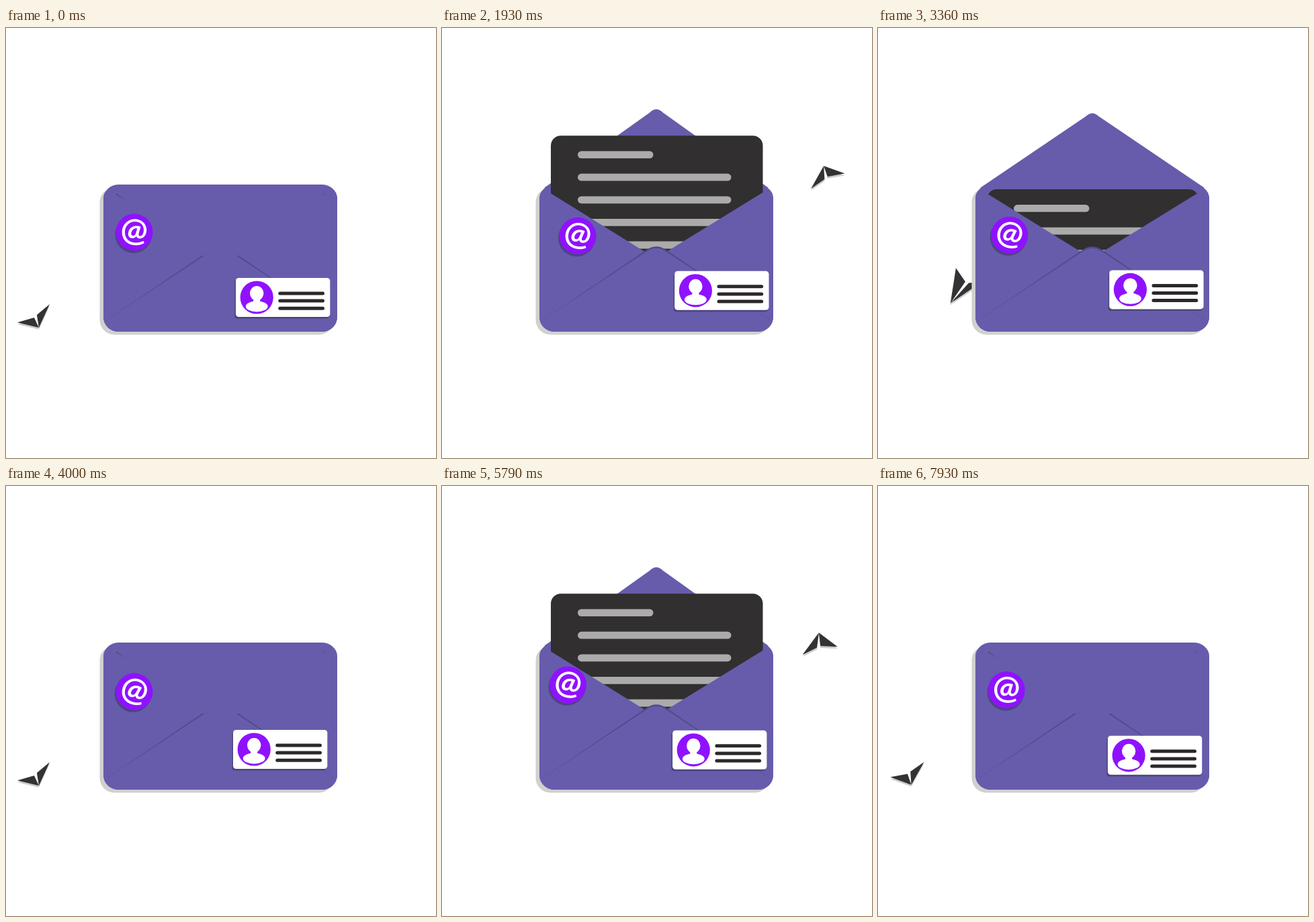
An HTML page with a canvas for the animation above (8 s loop, 640 by 640 pixels).

```html
<!DOCTYPE html>
<html lang="en">
<head>
<meta charset="utf-8">
<title>Mail</title>
<style>
html, body { margin: 0; width: 100%; height: 100%; overflow: hidden; background: #fff; }
canvas { display: block; width: 640px; height: 640px; }
</style>
</head>
<body>
<canvas id="stage" width="640" height="640"></canvas>
<script>
const ctx = document.getElementById('stage').getContext('2d');
const PURPLE = '#665cab', FOLD = '#51488c', VIOLET = '#8f12ff', DARK = '#312f30';
const SHADE = 'rgba(50,45,85,.5)';
const LOOP = 8000, CYCLE = 4000, HALF = 2000;

// Drifting stickers: time, badge x, y and tilt, card x, y
const drift = [
  [0, 191, 304, 2, 342, 372],
  [1070, 203, 308.5, 10, 342.5, 365.5],
  [2860, 198, 309, 9, 348.5, 359.5],
  [4000, 191, 306, 15, 338, 363],
  [4930, 175.5, 300.5, 2, 343.5, 366],
  [6860, 204, 293, 19, 341.5, 362]
];

// Plane seen while turning and while gliding, nose at the origin, [along, across]:
// wing tip, inner edge, inner edge, wing tip
const turning = [[-16, 29], [-16.4, 2.9], [-19.2, -2], [-29.8, -24.6]];
const gliding = [[-61, 20], [-48.5, -1.5], [-49, -7], [-62, -19.5]];

const clamp = v => Math.max(0, Math.min(1, v));
const mix = (a, b, u) => a + (b - a) * u;
const ramp = (t, from, to) => clamp((t - from) / (to - from));
const sine = u => (1 - Math.cos(Math.PI * u)) / 2;
const cubic = u => u < 0.5 ? 4 * u ** 3 : 1 - 4 * (1 - u) ** 3;
const hump = u => Math.sin(Math.PI * u);
const rad = deg => deg * Math.PI / 180;

// Smooth cyclic curve through the keys
function sample(keys, t) {
  const n = keys.length;
  const at = i => keys[(i + n) % n];
  const time = i => at(i)[0] + Math.floor(i / n) * LOOP;
  let i = 0;
  while (i < n - 1 && t >= time(i + 1)) i++;
  const h = time(i + 1) - time(i), u = (t - time(i)) / h;
  const slope = (k, j) => (at(k + 1)[j] - at(k - 1)[j]) / (time(k + 1) - time(k - 1)) * h;
  return at(i).map((v, j) => {
    const d = at(i + 1)[j] - v, a = slope(i, j), b = slope(i + 1, j);
    return v + u * (a + u * (3 * d - 2 * a - b + u * (a + b - 2 * d)));
  });
}

function poly(points, color) {
  ctx.fillStyle = color;
  ctx.beginPath();
  points.forEach(p => ctx.lineTo(p[0], p[1]));
  ctx.closePath();
  ctx.fill();
}

function box(x, y, w, h, r, color) {
  ctx.fillStyle = color;
  ctx.beginPath();
  ctx.roundRect(x, y, w, h, r);
  ctx.fill();
}

function oval(x, y, rx, ry, color) {
  ctx.fillStyle = color;
  ctx.beginPath();
  ctx.ellipse(x, y, rx, ry, 0, 0, 2 * Math.PI);
  ctx.fill();
}

function flap(open) {
  const hinge = 238, tip = 1 - 2 * open;
  ctx.fillStyle = PURPLE;
  ctx.beginPath();
  ctx.moveTo(152, hinge);
  ctx.lineTo(309, hinge + 112 * tip);
  ctx.quadraticCurveTo(319, hinge + 122 * tip, 329, hinge + 112 * tip);
  ctx.lineTo(486, hinge);
  ctx.closePath();
  ctx.fill();
}

function letter(t) {
  const up = cubic(ramp(t, 450, 1100)) * (1 - cubic(ramp(t, 2870, 3400)));
  const y = 160.2 + 80 * (1 - up);
  box(162, y, 315.5, 345 - y, [15, 15, 0, 0], DARK);
  for (let i = 0; i < 5; i++) {
    const full = i ? 228.5 : 112.5, start = i ? 666 + 190 * i : 750;
    const w = full * ramp(t, start, start + full * 0.87);
    if (w > 1) box(202, y + 23 + i * 33.6, w, 10.8, 5.4, '#ababab');
  }
}

function bottomFold(lift, color) {
  ctx.fillStyle = color;
  ctx.beginPath();
  ctx.moveTo(148, 436);
  ctx.lineTo(304, 333 - lift);
  ctx.quadraticCurveTo(319, 322.5 - lift, 334, 333 - lift);
  ctx.lineTo(490, 436);
  ctx.closePath();
  ctx.fill();
}

function pocket() {
  ctx.fillStyle = PURPLE;
  ctx.beginPath();
  ctx.moveTo(145, 255);
  ctx.quadraticCurveTo(145, 244, 152, 240);
  ctx.lineTo(301, 332.5);
  ctx.lineTo(335, 332.5);
  ctx.lineTo(486, 239.5);
  ctx.quadraticCurveTo(493, 244, 493, 255);
  ctx.arcTo(493, 452, 470, 452, 22);
  ctx.arcTo(145, 452, 145, 430, 22);
  ctx.closePath();
  ctx.fill();
  bottomFold(2.5, FOLD);
  bottomFold(0, PURPLE);
}

function envelope(t) {
  const open = sine(ramp(t, 70, 520)) * (1 - sine(ramp(t, 3300, 3900)));
  box(139.5, 237.5, 348, 219, 22, '#d0d0d0');
  if (open > 0.5) flap(open);
  box(145, 233, 348, 219, 22, PURPLE);
  letter(t);
  pocket();
  if (open <= 0.5) flap(open);
}

function badge(x, y, tilt) {
  ctx.save();
  ctx.translate(x, y);
  ctx.rotate(rad(tilt));
  oval(-1, 3.5, 27.5, 27.5, SHADE);
  oval(0, 0, 27.5, 27.5, VIOLET);
  ctx.fillStyle = '#fff';
  ctx.font = '700 48px Lato, "Open Sans", sans-serif';
  const m = ctx.measureText('@');
  ctx.fillText('@', (m.actualBoundingBoxLeft - m.actualBoundingBoxRight) / 2,
    (m.actualBoundingBoxAscent - m.actualBoundingBoxDescent) / 2);
  ctx.restore();
}

function card(x, y) {
  ctx.save();
  ctx.translate(x, y);
  box(-1.5, 2.5, 140, 58, 4, SHADE);
  box(0, 0, 140.3, 58, 4.5, '#fff');
  oval(31.2, 29, 24.6, 24.6, VIOLET);
  oval(31.2, 22.8, 10.2, 10.8, '#fff');
  box(26.2, 30, 10, 8, 0, '#fff');
  oval(31.2, 42.4, 16.4, 8, '#fff');
  for (let i = 0; i < 3; i++) box(63.3, 20.5 + i * 11.1, 68.7, 5, 2.5, '#2c2829');
  ctx.restore();
}

function plane(t) {
  const back = t >= HALF, u = t % HALF / HALF;
  const e = sine(u + (back ? 0.12 : 0.077) * hump(u));
  const far = back ? 1 - e : e;
  const x = mix(49, 569, far);
  const y = mix(446, 200, far) + (back ? -10 : 45) * hump(u);
  const heading = rad(75 - 180 * t / HALF - 10 * hump(u));
  const size = hump(u) ** 2;
  const [tipA, inA, inB, tipB] = turning.map((p, i) => p.map((v, j) => mix(v, gliding[i][j], size)));
  const nose = [0, 0];
  const wings = [[tipA, inA, nose], [tipB, inB, nose]];

  // The shadow falls straight down, whatever the heading
  for (const [drop, color] of [[2.8, 'rgba(0,0,0,.2)'], [0, '#343233']]) {
    ctx.save();
    ctx.translate(x, y + drop);
    ctx.rotate(heading);
    if (!drop) poly([inB, nose, inA, [inA[0] - 4 * size, inA[1]]], '#fff');
    wings.forEach(w => poly(w, color));
    ctx.restore();
  }
}

function draw(now) {
  const t = now % LOOP, part = t % CYCLE;
  const [, bx, by, tilt, cx, cy] = sample(drift, t);
  ctx.fillStyle = '#fff';
  ctx.fillRect(0, 0, 640, 640);
  if (part >= HALF) plane(part);
  envelope(part);
  badge(bx, by, tilt);
  card(cx, cy);
  if (part < HALF) plane(part);
}

const begin = performance.now();
function tick() {
  draw(performance.now() - begin);
  requestAnimationFrame(tick);
}
tick();
</script>
</body>
</html>
```
